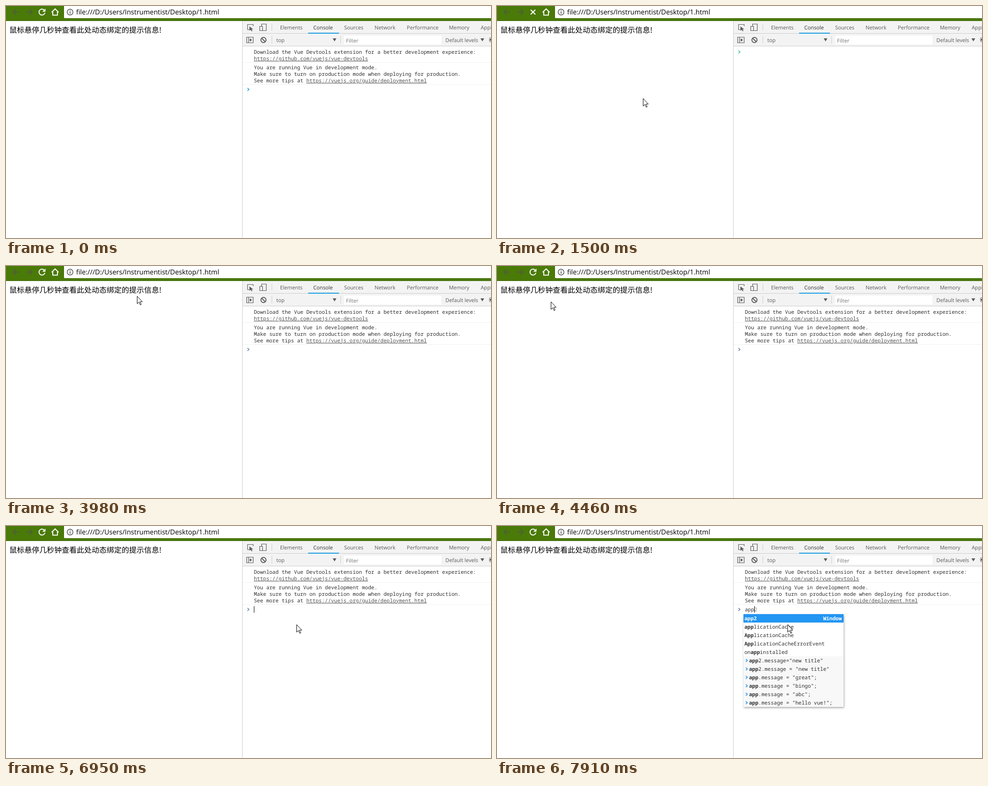
Animation of 1037x495 px, one loop 7990 ms. Source, as an HTML page:

```html
<!DOCTYPE html>
<html lang="zh">
<head>
<meta charset="utf-8">
<title>Vue title binding</title>
<style>
  html, body { margin: 0; width: 100%; height: 100%; overflow: hidden; background: #fff; }
  svg { display: block; width: 1037px; height: 495px; }
  text { white-space: pre; text-rendering: geometricPrecision; }
  .url { font: 14.55px "Open Sans", sans-serif; fill: #000; }
  .page { font: 16px "Noto Sans CJK SC", "Noto Sans CJK", sans-serif; fill: #000; }
  .ui { font: 11.2px "Open Sans", sans-serif; fill: #5a5a5a; }
  .on { fill: #333; }
  .dim { fill: #757575; }
  .code { font: 11px "Noto Sans Mono", monospace; fill: #303030; }
  .link { fill: #545454; text-decoration: underline; }
  .hint { fill: #888; }
  .inv { fill: #fff; font-weight: bold; }
  .b { font-weight: bold; }
  .tip { font: 12.2px "Open Sans", "Noto Sans CJK SC", "Noto Sans CJK", sans-serif; fill: #575757; }
  .menu { font: 12px "Open Sans", "Noto Sans CJK SC", "Noto Sans CJK", sans-serif; fill: #222; }
  .off { fill: #999; }
  .end { text-anchor: end; }
  .line { fill: none; stroke: #5a5a5a; stroke-width: 1.2; }
  .shadow { filter: drop-shadow(1px 2px 2px rgba(0, 0, 0, .35)); }
</style>
</head>
<body>
<svg id="stage" viewBox="0 0 1037 495"></svg>
<script>
const LOOP = 7990;
const text = (x, y, cls, s) => `<text x="${x}" y="${y}" class="${cls}">${s}</text>`;
const rect = (x, y, w, h, fill, more = '') =>
  `<rect x="${x}" y="${y}" width="${w}" height="${h}" fill="${fill}" ${more}/>`;
const path = (d, more) => `<path d="${d}" ${more}/>`;
const group = (id, body, more = '') => `<g id="${id}" ${more}>${body}</g>`;
const line = d => path(d, 'class="line"');
const chevron = (x, y, color) =>
  path(`M${x} ${y - 3}l3.2 3l-3.2 3`, `fill="none" stroke="${color}" stroke-width="1.7"`);

function browserBar() {
  const nav = d => path(d, 'fill="none" stroke="#4f5f38" stroke-width="2"');
  return rect(0, 0, 1037, 31, '#4a7a08') + rect(0, 31, 1037, 1, '#3c6306') +
    nav('M28 13H15.5M21 7L15 13L21 19') + nav('M43 13H55.5M50 7L56 13L50 19') +
    group('reload', path('M17.65 6.35A7.96 7.96 0 0 0 12 4a8 8 0 1 0 7.73 10h-2.08A6 6 0 1 1 12 6c1.66 0 3.14.69 4.22 1.78L13 11h7V4z',
      'fill="#fff" stroke="#fff" stroke-width=".4" transform="translate(66.2 2.2) scale(.9)"')) +
    group('stop', path('M72 8L82 18M82 8L72 18', 'stroke="#fff" stroke-width="2.2"')) +
    path('M97.5 13.5L105 6.2L112.5 13.5M100 12V19.5H110V12', 'fill="none" stroke="#fff" stroke-width="2"') +
    rect(123.5, -6, 930, 32.5, '#fff', 'rx="2.5" stroke="#3f6807"') +
    '<circle cx="137" cy="13" r="6.2" fill="none" stroke="#555" stroke-width="1.5"/>' +
    rect(136.2, 12, 1.7, 4.5, '#555') + rect(136.2, 9.2, 1.7, 1.7, '#555') +
    text(150, 18, 'url', 'file:///D:/Users/Instrumentist/Desktop/1.html');
}

function devtools() {
  const tabs = [[586, 'Elements'], [657, 'Console'], [723, 'Sources'], [788, 'Network'],
    [857, 'Performance'], [947, 'Memory'], [1015, 'Application']];
  const caretDown = x => path(`M${x - 4} 69h8l-4 6.5z`, 'fill="#5a5a5a"');
  return rect(505, 32, 1, 463, '#ccc') + rect(506, 32, 531, 54, '#f3f3f3') +
    rect(506, 58, 531, 1, '#ccc') + rect(506, 85, 531, 1, '#ccc') +
    rect(646, 57, 66, 2, '#1a9be3') +
    tabs.map(([x, s]) => text(x, 50, s === 'Console' ? 'ui on' : 'ui', s)).join('') +
    line('M520 50.5H516.5V39.5H528.5V43') +
    path('M520.5 43.5V53L523 50.8L525.5 54L527 53L524.8 49.8H528.5Z', 'fill="#5a5a5a"') +
    line('M546.5 43V38.5H556.5V52.5H549M542.5 43.5H548.5V52.5H542.5Z') +
    rect(568, 38, 1, 15, '#ccc') + rect(568, 64, 1, 16, '#ccc') + rect(715, 64, 1, 16, '#ccc') +
    line('M514.5 66.5H528.5V78.5H514.5ZM518.5 66.5V78.5') +
    path('M521 69l5 3.5l-5 3.5z', 'fill="#5a5a5a"') +
    path('M546.5 68.5L554.5 76.5M556 72.5a5.5 5.5 0 1 1 -11 0a5.5 5.5 0 1 1 11 0', 'fill="none" stroke="#5a5a5a" stroke-width="1.9"') +
    text(578, 77, 'ui', 'top') + caretDown(702.5) +
    rect(723, 63, 208, 19, '#fff') + text(727, 78, 'ui dim', 'Filter') +
    text(939.5, 77, 'ui', 'Default levels') + caretDown(1018.5) +
    rect(1033.5, 67.5, 10, 9, '#ddd', 'rx="2" stroke="#777"') + rect(1035, 70, 3, 4, '#444');
}

function messages() {
  return text(530, 102, 'code', 'Download the Vue Devtools extension for a better development experience:') +
    text(530, 116, 'code link', 'https://github.com/vuejs/vue-devtools') +
    rect(506, 120, 531, 1, '#f0f0f0') +
    text(530, 135, 'code', 'You are running Vue in development mode.') +
    text(530, 149, 'code', 'Make sure to turn on production mode when deploying for production.') +
    text(530, 163, 'code', 'See more tips at ') +
    text(642.2, 163, 'code link', 'https://vuejs.org/guide/deployment.html') +
    rect(506, 167, 531, 1, '#f0f0f0');
}

function contextMenu() {
  const items = [['返回(B)', 'Alt+向左箭头', 1], ['前进(F)', 'Alt+向右箭头', 1], ['重新加载(R)', 'Ctrl+R'], 0,
    ['另存为(A)...', 'Ctrl+S'], ['打印(P)...', 'Ctrl+P'], ['投射(C)...', ''], ['翻成中文（简体）(T)', ''], 0,
    ['查看网页源代码(V)', 'Ctrl+U'], ['检查(N)', 'Ctrl+Shift+I']];
  let y = 137, out = '';
  for (const it of items) {
    if (it) {
      const cls = it[2] ? 'menu off' : 'menu';
      out += text(258, y + 18, cls, it[0]) + text(482, y + 18, cls + ' end', it[1]);
      y += 28;
    } else {
      out += rect(231, y + 7, 264, 1, '#e0e0e0');
      y += 15;
    }
  }
  return rect(230.5, 133.5, 265, 289, '#fff', 'stroke="#bababa" class="shadow"') +
    group('hover', rect(231, 193, 264, 28, '#e6e6e6')) + out;
}

const tooltip = () => rect(5, 5, 203, 20, '#000', 'opacity=".4"') +
  rect(.5, .5, 204, 21, '#fff', 'stroke="#767676"') +
  text(5.5, 15, 'tip', '页面加载于 2018/9/6 上午10:03:16');

const ALL = ['alert', 'app2', 'applicationCache', 'atob', 'addEventListener', 'AbortController',
  'AbortSignal', 'AnalyserNode', 'Animation', 'AnimationEvent', 'ApplicationCache',
  'ApplicationCacheErrorEvent', 'Array', 'ArrayBuffer', 'Attr', 'Audio', 'AudioBuffer'];
const APP = ['app2', 'applicationCache', 'ApplicationCache', 'ApplicationCacheErrorEvent', 'onappinstalled'];
const HISTORY = ['app2.message="new title"', 'app2.message = "new title"', 'app.message = "great";',
  'app.message = "bingo";', 'app.message = "abc";', 'app.message = "hello vue!";'];

function popup(typed, names, history, w) {
  const mark = s => s.replace(new RegExp(typed, 'i'), m => `<tspan class="b">${m}</tspan>`);
  const top = i => 188 + 18 * i, n = names.length;
  return rect(527, 188, w, top(n + history.length) - 188, '#fff', 'class="shadow"') +
    rect(527, 188, w, 18, '#2196f3') +
    text(527 + w - 4, 201, 'code inv end', 'Window') +
    (history.length ? rect(527, top(n), w, 18 * history.length, '#f8f8f8') : '') +
    names.map((s, i) => text(529, top(i) + 13, i ? 'code' : 'code inv', i ? mark(s) : s)).join('') +
    history.map((s, i) => chevron(532, top(n + i) + 9, '#2196f3') +
      text(539, top(n + i) + 13, 'code', mark(s))).join('');
}

// Console input: start time, typed text, completion, popup
const TYPING = [
  [7500, 'a', '', ''],
  [7580, 'a', 'lert', popup('a', ALL, [], 264)],
  [7660, 'ap', 'p2', popup('ap', ALL, [], 264)],
  [7750, 'ap', 'p2', popup('ap', APP, HISTORY, 214)],
  [7830, 'app', '2', popup('app', APP, HISTORY, 214)]
];
const typingView = ([, typed, rest, list], i) => {
  const x = 530 + typed.length * 6.6;
  return group('type' + i, text(530, 182, 'code', typed) + text(x, 182, 'code hint', rest) +
    rect(Math.round(x), 171, 1, 14, '#000') + list);
};

document.getElementById('stage').innerHTML =
  rect(0, 0, 1037, 495, '#fff') + browserBar() +
  text(7.3, 57, 'page', '鼠标悬停几秒钟查看此处动态绑定的提示信息!') +
  devtools() + group('log', messages()) +
  group('prompt0', chevron(516.3, 178, '#1f9be8')) +
  group('prompt1', chevron(516.3, 98, '#3fbf84')) +
  group('prompt2', chevron(516.3, 178, '#6b7bb0')) +
  group('caret', rect(530, 171, 1, 14, '#000')) +
  TYPING.map(typingView).join('') +
  group('menu', contextMenu()) +
  group('tipA', tooltip(), 'transform="translate(289 63)"') +
  group('tipB', tooltip(), 'transform="translate(130 61)"') +
  group('arrow', path('M.5 .5V16.5L4.3 13L7 19L9.2 18L6.6 12.2H11.5Z', 'fill="#fff" stroke="#000"')) +
  group('beam', path('M-3.5 -7.5H-1Q.5 -7.5 .5 -6Q.5 -7.5 2 -7.5H4.5M.5 -6.5V6.5M-3.5 7.5H-1Q.5 7.5 .5 6Q.5 7.5 2 7.5H4.5',
    'fill="none" stroke="#000"'));

// Pointer moves: start, end, number of steps, waypoints
const MOVES = [
  [70, 580, 7, [[745, 398], [560, 300], [380, 205], [262, 146], [230, 133]]],
  [960, 1200, 4, [[255, 148], [303, 177], [311, 192], [312, 197]]],
  [1970, 2590, 9, [[311, 190], [290, 115], [283, 75], [286, 56], [293, 56]]],
  [3980, 4690, 10, [[280, 64], [250, 105], [163, 111], [101, 96], [115, 76], [122, 68], [131, 61]]],
  [4790, 4860, 2, [[133, 56], [134, 54]]],
  [6320, 6730, 6, [[190, 75], [400, 145], [595, 200], [621, 210]]]
];

function pointer(t) {
  const move = MOVES.filter(m => t >= m[0]).pop();
  if (!move) return null;
  const [start, end, steps, pts] = move;
  const k = Math.min(steps - 1, Math.floor((t - start) / (end - start) * (steps - 1) + 1e-6));
  const u = k / (steps - 1) * (pts.length - 1);
  const i = Math.min(pts.length - 2, Math.floor(u + 1e-6)), f = u - i;
  return [0, 1].map(a => Math.round(pts[i][a] + (pts[i + 1][a] - pts[i][a]) * f));
}

const el = id => document.getElementById(id);
const show = (id, on) => { el(id).style.display = on ? '' : 'none'; };
function fade(id, t, from, to) {
  show(id, t >= from && t < to);
  el(id).style.opacity = Math.min(1, (Math.floor((t - from) / 75) + 1) / 3);
}

function draw(t) {
  const loading = t >= 1420 && t < 1660, cleared = t >= 1500 && t < 1580;
  show('reload', !loading);
  show('stop', loading);
  show('log', !cleared);
  show('prompt0', t < 1500);
  show('prompt1', cleared);
  show('prompt2', t >= 1580);
  fade('menu', t, 800, 1420);
  fade('tipA', t, 2990, 3980);
  fade('tipB', t, 5230, 6320);
  show('caret', t >= 6950 && t < 7500);
  TYPING.forEach((s, i) => show('type' + i, t >= s[0] && t < (TYPING[i + 1] || [LOOP])[0]));

  const p = pointer(t);
  const overText = p && p[1] < 63 && p[0] < 340;
  show('arrow', p && !overText);
  show('beam', overText);
  show('hover', p && p[1] >= 193);
  if (p) el(overText ? 'beam' : 'arrow').setAttribute('transform', `translate(${p})`);
}

function tick() {
  draw(performance.now() % LOOP);
  requestAnimationFrame(tick);
}
tick();
</script>
</body>
</html>
```
